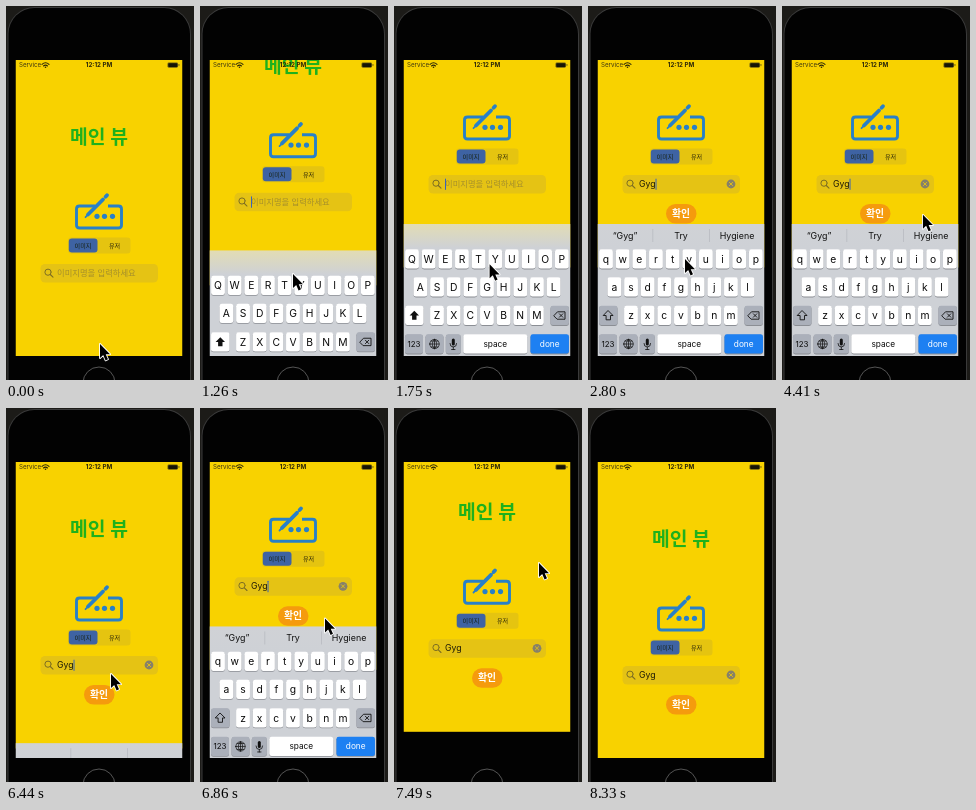
Animation, 188 px wide and 374 px high, one loop 9310 ms. Source, as an HTML page with a canvas:

```html
<!DOCTYPE html>
<html lang="ko">
<head>
<meta charset="utf-8">
<style>
  html, body { margin: 0; width: 100%; height: 100%; overflow: hidden; background: #000; }
  canvas { display: block; width: 100vw; height: 100vh; }
</style>
</head>
<body>
<canvas id="stage"></canvas>
<script>
const W = 188, H = 374, LOOP = 9310, STEP = 70;
const SCREEN = { x: 9.5, y: 54, w: 167, h: 296 };
const BOTTOM = 350, LIFT = 89, KEYBOARD_H = 132;
const FONT = 'Inter, "Noto Sans CJK KR", "Noto Sans CJK", sans-serif';
const canvas = document.getElementById('stage');
const c = canvas.getContext('2d');

// Pointer tip: time, x, y
const POINTER = [
  [0, 94, 338], [70, 94, 338], [840, 93, 268], [1330, 93, 268], [2030, 97, 253],
  [2800, 97, 253], [3010, 158, 288], [3430, 164, 320], [3990, 128, 222],
  [4060, 135, 217], [4270, 135, 217], [4480, 143, 206], [5110, 143, 206],
  [5250, 100, 380], [5460, 90, 376], [6160, 105, 266], [6580, 105, 266],
  [7140, 145, 155], [7490, 145, 155], [8260, 95, 365], [8330, 95, 382], [LOOP, 95, 382]
];

// Typed text with its suggestions
const TYPING = [
  [0, '', []],
  [1890, 'G', ['“G”', 'Good', 'Get']],
  [2240, 'Gy', ['“Gy”', 'Gym', 'Guy']],
  [2520, 'Gyg', ['“Gyg”', 'Try', 'Hygiene']]
];

const clamp = v => Math.max(0, Math.min(1, v));

// Critically damped rise from 0 to 1
function spring(ms) {
  const u = Math.max(0, ms) * 0.0173;
  return 1 - (1 + u) * Math.exp(-u);
}

function pointerAt(t) {
  const i = POINTER.findIndex(p => p[0] > t);
  const [t0, x0, y0] = POINTER[i - 1], [t1, x1, y1] = POINTER[i];
  const k = (t - t0) / (t1 - t0), e = k * k * (3 - 2 * k);
  return [x0 + (x1 - x0) * e, y0 + (y1 - y0) * e];
}

function box(x, y, w, h, r, fill) {
  c.beginPath();
  c.roundRect(x, y, w, h, r);
  c.fillStyle = fill;
  c.fill();
}

function text(str, x, y, size, color, weight = 400, align = 'center') {
  c.font = `${weight} ${size}px ${FONT}`;
  c.textAlign = align;
  c.textBaseline = 'alphabetic';
  c.fillStyle = color;
  c.fillText(str, x, y + size * 0.36);
}

function line(path, color, width, cap = 'round') {
  c.strokeStyle = color;
  c.lineWidth = width;
  c.lineCap = cap;
  c.lineJoin = 'round';
  c.stroke(new Path2D(path));
}

function disc(x, y, r, color) {
  c.beginPath();
  c.arc(x, y, r, 0, 7);
  c.fillStyle = color;
  c.fill();
}

function drawPhone() {
  c.fillStyle = '#1c1b18';
  c.fillRect(0, 0, W, H);
  box(1.5, 1, 183.5, 420, 27, '#3a3a3a');
  box(2.5, 2, 181.5, 420, 26, '#020202');
  c.beginPath();
  c.arc(93, 377, 16, 0, 7);
  c.strokeStyle = '#555';
  c.lineWidth = 1;
  c.stroke();
}

function drawStatus() {
  text('Service', 13, 59, 6.2, '#3b3410', 400, 'left');
  text('12:12 PM', 93, 59, 6.2, '#2b2608', 700);
  line('M36 58.3Q39.5 55.2 43 58.3M37.5 60Q39.5 58.2 41.5 60', '#2b2608', 1.1);
  disc(39.5, 61.3, 0.8, '#2b2608');
  box(161.5, 56.5, 10.5, 5.2, 1.4, '#6d5f13');
  box(162.3, 57.2, 9, 3.8, 0.8, '#171505');
  box(172.5, 58, 0.9, 2.2, 0.4, '#6d5f13');
}

function drawIcon() {
  const blue = '#2880c8';
  line('M89 200H73.5Q70.5 200 70.5 203V219Q70.5 222 73.5 222H112.5Q115.5 222 115.5 219V203Q115.5 200 112.5 200H102', blue, 2.9, 'butt');
  line('M82 208.5L97 193.5M99.6 190.7L101 189.2', blue, 3.8);
  line('M79.5 211.2L82 208.7', blue, 1.8);
  [91, 98.5, 106.5].forEach(x => disc(x, 210.3, 2.6, blue));
}

function drawForm(typed, caret) {
  text('메인 뷰', 93, 131, 19.3, '#1fb11c', 700);
  drawIcon();

  box(62, 231.5, 62.5, 16, 3, '#e5c410');
  box(62.8, 232.5, 28.7, 14, 3, '#3e63a3');
  text('이미지', 77, 239.5, 6.1, '#17200f', 500);
  text('유저', 108.5, 239.5, 6.1, '#2b2608', 500);

  box(34.5, 258, 117.5, 18.5, 4.5, '#e5c314');
  c.beginPath();
  c.arc(42, 266.2, 3.1, 0, 7);
  c.strokeStyle = '#7d6e22';
  c.lineWidth = 1;
  c.stroke();
  line('M44.3 268.5L47 271.2', '#7d6e22', 1.1);

  if (typed) {
    text(typed, 51, 267, 8.7, '#1d1a06', 400, 'left');
    disc(143, 267, 4.4, '#86806a');
    line('M141.4 265.4L144.6 268.6M144.6 265.4L141.4 268.6', '#e5c314', 0.9);
    box(78, 287, 30.5, 19.5, 9.7, '#f59b0d');
    text('확인', 93, 296.5, 9.8, '#fff', 700);
  } else {
    text('이미지명을 입력하세요', 51, 267, 8.3, '#a58f2b', 400, 'left');
  }
  if (caret) {
    c.font = `400 8.7px ${FONT}`;
    box(51 + c.measureText(typed).width, 261.5, 1, 11.5, 0.4, '#3a64b8');
  }
}

function key(x, y, w, label, size = 10.3, fill = '#fff', color = '#0b0b0b') {
  box(x - w / 2, y - 9.2, w, 19.6, 2.4, '#8b8e94');
  box(x - w / 2, y - 9.7, w, 19.3, 2.4, fill);
  if (label) text(label, x, y, size, color);
}

function drawKeyboard(top, caps, suggestions, fadedBar) {
  const grey = '#abb0ba', ink = '#111';
  c.save();
  c.translate(0, top - 218);
  const back = c.createLinearGradient(0, 218, 0, 242);
  back.addColorStop(0, fadedBar ? '#e2dcb4' : '#d0d2d6');
  back.addColorStop(1, '#ced1d6');
  c.fillStyle = back;
  c.fillRect(SCREEN.x, 218, SCREEN.w, KEYBOARD_H + 1);

  if (!fadedBar) {
    c.fillStyle = '#b5b8be';
    c.fillRect(64.5, 223, 0.7, 13);
    c.fillRect(121, 223, 0.7, 13);
  }
  suggestions.forEach((word, i) => text(word, 37 + 56 * i, 229.5, 8.9, ink));

  [['qwertyuiop', 18, 253], ['asdfghjkl', 26.4, 281], ['zxcvbnm', 43, 309.5]].forEach(([row, x, y]) =>
    [...row].forEach((ch, i) => key(x + i * 16.65, y, 13.8, caps ? ch.toUpperCase() : ch)));

  key(20.3, 309.5, 18.5, '', 9, caps ? '#fff' : grey);
  const arrow = new Path2D('M20.3 304.8L25 309.5H22.5V313.8H18.1V309.5H15.6Z');
  c.fillStyle = ink;
  c.strokeStyle = ink;
  c.lineWidth = 0.9;
  caps ? c.fill(arrow) : c.stroke(arrow);

  key(165.7, 309.5, 18.5, '', 9, grey);
  line('M160 309.5L163.5 305.8H171V313.2H163.5ZM165.4 307.8L168.8 311.2M168.8 307.8L165.4 311.2', ink, 0.9);

  key(20, 338, 18, '123', 8, grey);
  key(40.5, 338, 18, '', 8, grey);
  line('M35.8 338a4.7 4.7 0 1 0 9.4 0a4.7 4.7 0 1 0 -9.4 0ZM35.8 338H45.2M40.5 333.3V342.7M40.5 333.3Q35.8 338 40.5 342.7Q45.2 338 40.5 333.3M37 335H44M37 341H44', ink, 0.7);
  key(59.3, 338, 15, '', 8, grey);
  box(57.8, 332.6, 3, 7, 1.5, ink);
  line('M56 337.5Q56 341 59.3 341Q62.6 341 62.6 337.5M59.3 341V343.5M57.6 343.5H61', ink, 0.8);
  key(101.3, 338, 64, 'space', 8.3);
  key(155.7, 338, 38.5, 'done', 8.3, '#1d80f2', '#fff');
  c.restore();
}

function drawPointer(x, y) {
  const shape = new Path2D('M0 0V14L3.2 11L5.6 16.4L8 15.3L5.7 10.2H10Z');
  c.save();
  c.translate(x, y);
  c.lineJoin = 'round';
  c.lineWidth = 1.8;
  c.strokeStyle = '#fff';
  c.stroke(shape);
  c.fillStyle = '#000';
  c.fill(shape);
  c.restore();
}

function render(t) {
  const sessions = [[1087, 4657], [6407, 7349]];
  const [open, close] = sessions[t < 6407 ? 0 : 1];
  const closing = t >= close;
  const raised = closing ? 1 - spring(t - close) : spring(t - open);
  const keyboard = closing ? clamp(1 - (t - close) / 130) : raised;
  const [, typed, words] = TYPING.filter(s => s[0] <= t).pop();
  const suggestions = t > 6400 && t < 6580 ? [] : words;

  drawPhone();
  c.save();
  c.beginPath();
  c.rect(SCREEN.x, SCREEN.y, SCREEN.w, SCREEN.h);
  c.clip();
  c.save();
  c.translate(0, -LIFT * raised);
  c.fillStyle = '#f8d200';
  c.fillRect(SCREEN.x, SCREEN.y, SCREEN.w, SCREEN.h + 0.5);
  drawForm(typed, t >= open && !closing);
  c.restore();
  drawStatus();
  if (keyboard > 0) drawKeyboard(BOTTOM - KEYBOARD_H * keyboard, !typed, suggestions, !typed);
  c.restore();
  drawPointer(...pointerAt(t));
}

function frame(now) {
  const scale = window.devicePixelRatio || 1;
  const w = Math.round(innerWidth * scale), h = Math.round(innerHeight * scale);
  if (canvas.width !== w || canvas.height !== h) {
    canvas.width = w;
    canvas.height = h;
  }
  c.setTransform(w / W, 0, 0, h / H, 0, 0);
  render(Math.floor((now % LOOP) / STEP) * STEP);
  requestAnimationFrame(frame);
}
requestAnimationFrame(frame);
</script>
</body>
</html>
```
